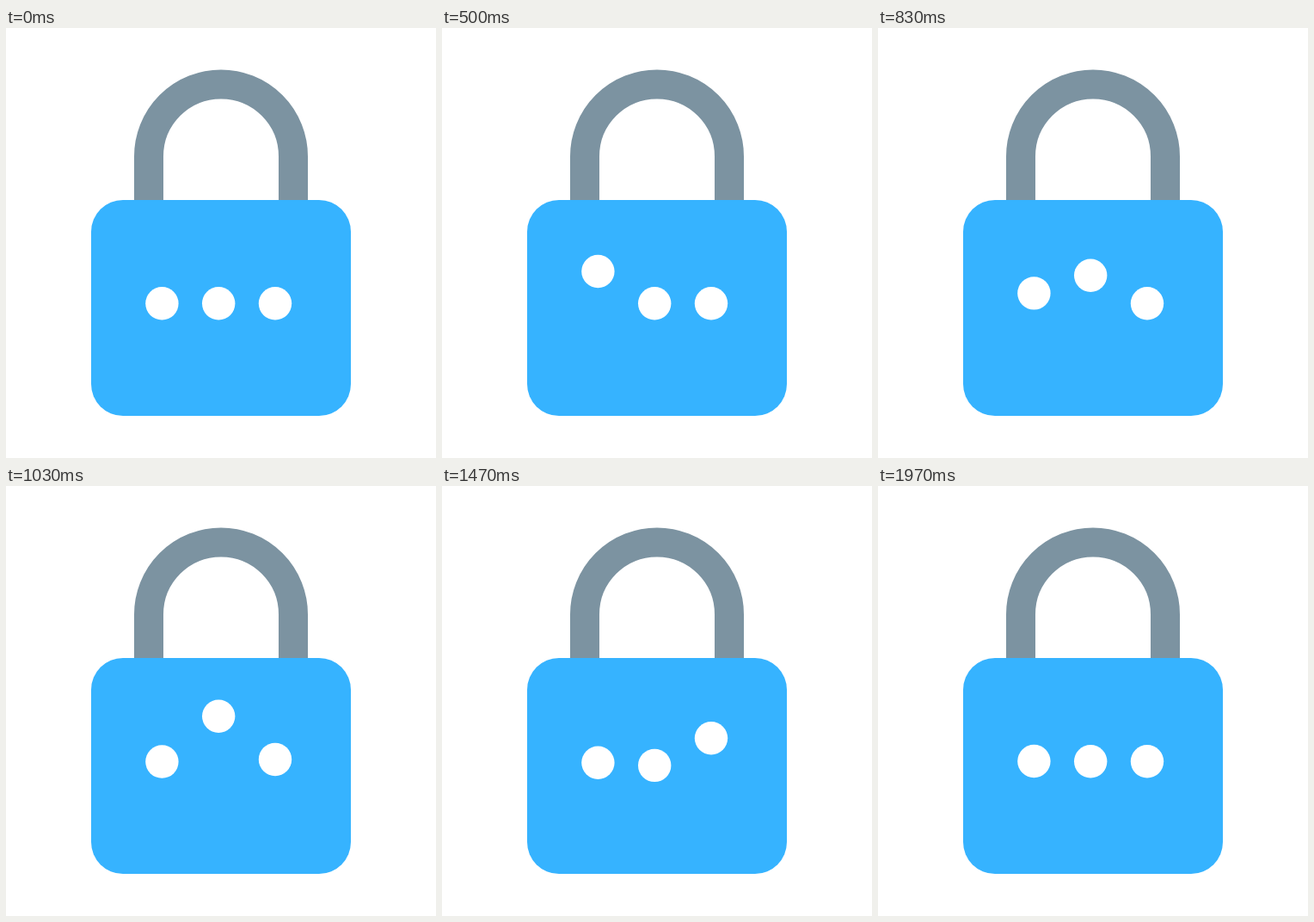
An HTML page for the animation above (2000 ms loop, 500x500 px).

```html
<!DOCTYPE html>
<html lang="en">
<head>
<meta charset="utf-8">
<title>Padlock</title>
<style>
  html, body { margin: 0; width: 100%; height: 100%; overflow: hidden; background: #fff; }
  svg { display: block; width: 100%; height: 100%; }
</style>
</head>
<body>
<svg viewBox="0 0 500 500">
  <path d="M166 204V149.5a84 84 0 0 1 168 0V204" fill="none" stroke="#7c93a1" stroke-width="34"/>
  <rect x="99" y="200" width="302" height="251" rx="37" fill="#36b3ff"/>
  <g fill="#fff">
    <circle class="dot" cx="181.4" cy="320.3" r="19.2"/>
    <circle class="dot" cx="247.2" cy="320.3" r="19.2"/>
    <circle class="dot" cx="313" cy="320.3" r="19.2"/>
  </g>
</svg>
<script>
const LOOP = 2000, FPS = 30;
const REST = 320.3, TOP = 264, LOW = 337, SAG = 4.6;
const RISE = 10, FALL = 10, END = 49;   // in animation steps

function bezier(x1, y1, x2, y2) {
  const at = (a, b, t) => 3 * (1 - t) ** 2 * t * a + 3 * (1 - t) * t * t * b + t ** 3;
  return x => {
    let lo = 0, hi = 1;
    for (let i = 0; i < 24; i++) {
      const mid = (lo + hi) / 2;
      if (at(x1, x2, mid) < x) lo = mid; else hi = mid;
    }
    return at(y1, y2, (lo + hi) / 2);
  };
}

const firstRise = bezier(.48, 0, .55, 1);
const laterRise = bezier(.62, 0, .55, 1);
const fall = bezier(.58, 0, .65, .92);
const smooth = u => u * u * (3 - 2 * u);

// Travel from one height to a turning point and on to another, by path length.
function thereAndBack(from, turn, to, progress) {
  const out = Math.abs(turn - from), back = Math.abs(to - turn);
  const way = progress * (out + back);
  return way < out ? from + way : turn - (way - out);
}

function height(step, start, rise) {
  const peak = start + RISE, landed = peak + FALL;
  if (step <= start || step >= END) return REST;
  if (step < peak) return REST + (TOP - REST) * rise((step - start) / RISE);
  if (step < landed) return thereAndBack(TOP, LOW, REST, fall((step - peak) / FALL));
  return thereAndBack(REST, REST + SAG, REST, smooth((step - landed) / (END - landed)));
}

const dots = [...document.querySelectorAll('.dot')];
const begin = performance.now();

function draw() {
  const time = (performance.now() - begin) % LOOP;
  const step = Math.floor(time * FPS / 1000 + .2) % 60;
  dots.forEach((dot, i) => {
    let y = height(step, 9 + 10 * i, i ? laterRise : firstRise);
    if (i === 0 && step === 59) y -= .3;
    dot.setAttribute('cy', y.toFixed(2));
  });
  requestAnimationFrame(draw);
}
draw();
</script>
</body>
</html>
```
